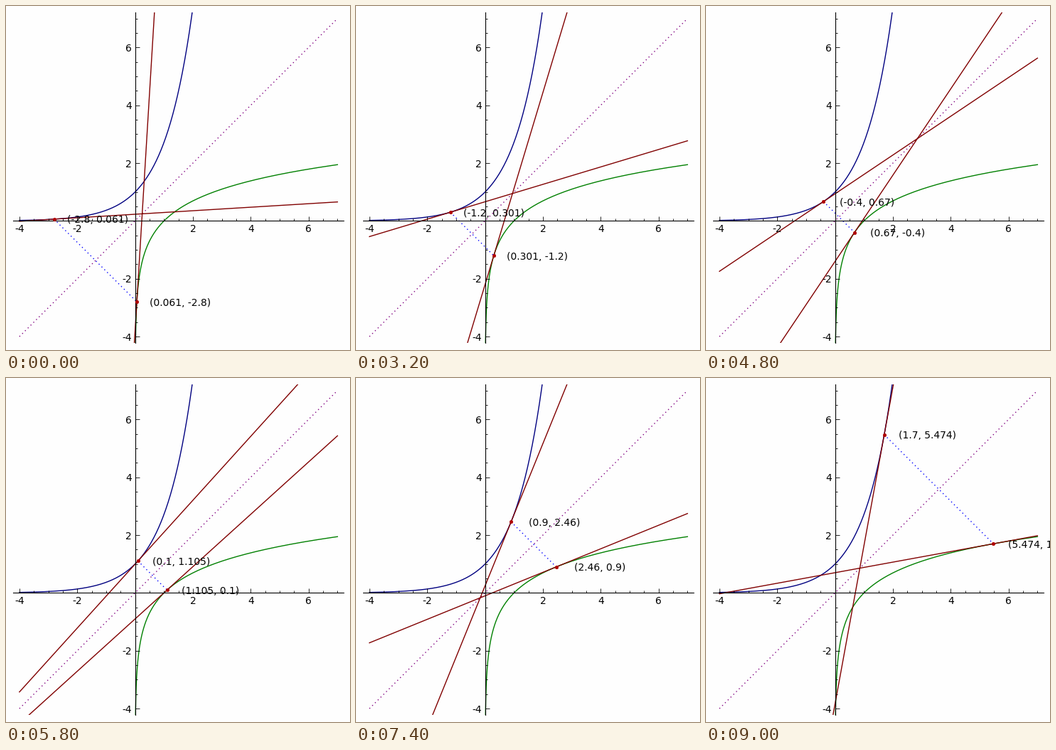
These frames come from a looping animation (484x484 px, 9200 ms). A matplotlib script:

```python
import numpy as np
import matplotlib.pyplot as plt
from matplotlib.animation import FuncAnimation
from matplotlib.ticker import FuncFormatter, MultipleLocator

SIZE, DPI = 484, 100
MARGIN, SPAN = 9.93 / SIZE, 465.4 / SIZE
LO, HI, PAD = -4, 7, 0.22
FRAMES, INTERVAL = 46, 200
LABEL_SHIFT = 1.5
DOTS = (0, (1, 3))

plt.rcParams.update({
    "font.family": "DejaVu Sans",
    "font.size": 10,
    "axes.unicode_minus": False,
    "axes.axisbelow": False,
})

fig = plt.figure(figsize=(SIZE / DPI, SIZE / DPI), dpi=DPI, facecolor="#fefefe")
ax = fig.add_axes([MARGIN, MARGIN, SPAN, SPAN])
ax.set_facecolor("none")
ax.set_xlim(LO - PAD, HI + PAD)
ax.set_ylim(LO - PAD, HI + PAD)

# Axes crossing at the origin, with no label at zero
for side in ("top", "right"):
    ax.spines[side].set_visible(False)
for side in ("left", "bottom"):
    ax.spines[side].set_position(("data", 0))
    ax.spines[side].set_linewidth(0.8)
for axis in (ax.xaxis, ax.yaxis):
    axis.set_major_locator(MultipleLocator(2))
    axis.set_minor_locator(MultipleLocator(0.5))
    axis.set_major_formatter(FuncFormatter(lambda v, _: f"{v:.0f}" if abs(v) > 0.1 else ""))
ax.tick_params(which="major", direction="in", length=4, width=0.6, pad=3.6)
ax.tick_params(which="minor", direction="in", length=2, width=0.6)


def line(color, xs=(), ys=(), style="-"):
    return ax.plot(xs, ys, color=color, lw=1, ls=style, dash_capstyle="butt")[0]


# Each curve is the mirror image of the other in y = x
t = np.linspace(LO, 2.1, 300)
line("#000080", t, np.exp(t))
t = np.linspace(LO - PAD, np.log(HI), 300)
line("#008000", np.exp(t), t)
line("#800080", (LO, HI), (LO, HI), DOTS)

link = line("#0000ff", style=DOTS)
tangents = [line("#800000") for _ in range(2)]
points = ax.scatter([0, 0], [0, 0], s=10, color="#b00000", linewidths=0.5, zorder=5)
labels = [ax.text(0, 0, "", ha="center", va="center_baseline", zorder=4) for _ in range(2)]


def update(i):
    x = (i - 28) / 10
    y = np.exp(x)
    pts = [(x, y), (y, x)]
    ends = np.array([LO, HI])
    for (px, py), slope, tangent, label in zip(pts, (y, 1 / y), tangents, labels):
        tangent.set_data(ends, py + slope * (ends - px))
        label.set_position((px + LABEL_SHIFT, py))
        label.set_text(f"({round(float(px), 3)}, {round(float(py), 3)})")
    link.set_data(*zip(*pts))
    points.set_offsets(pts)
    return [link, points, *tangents, *labels]


anim = FuncAnimation(fig, update, frames=FRAMES, interval=INTERVAL, repeat=True)
plt.show()
```
